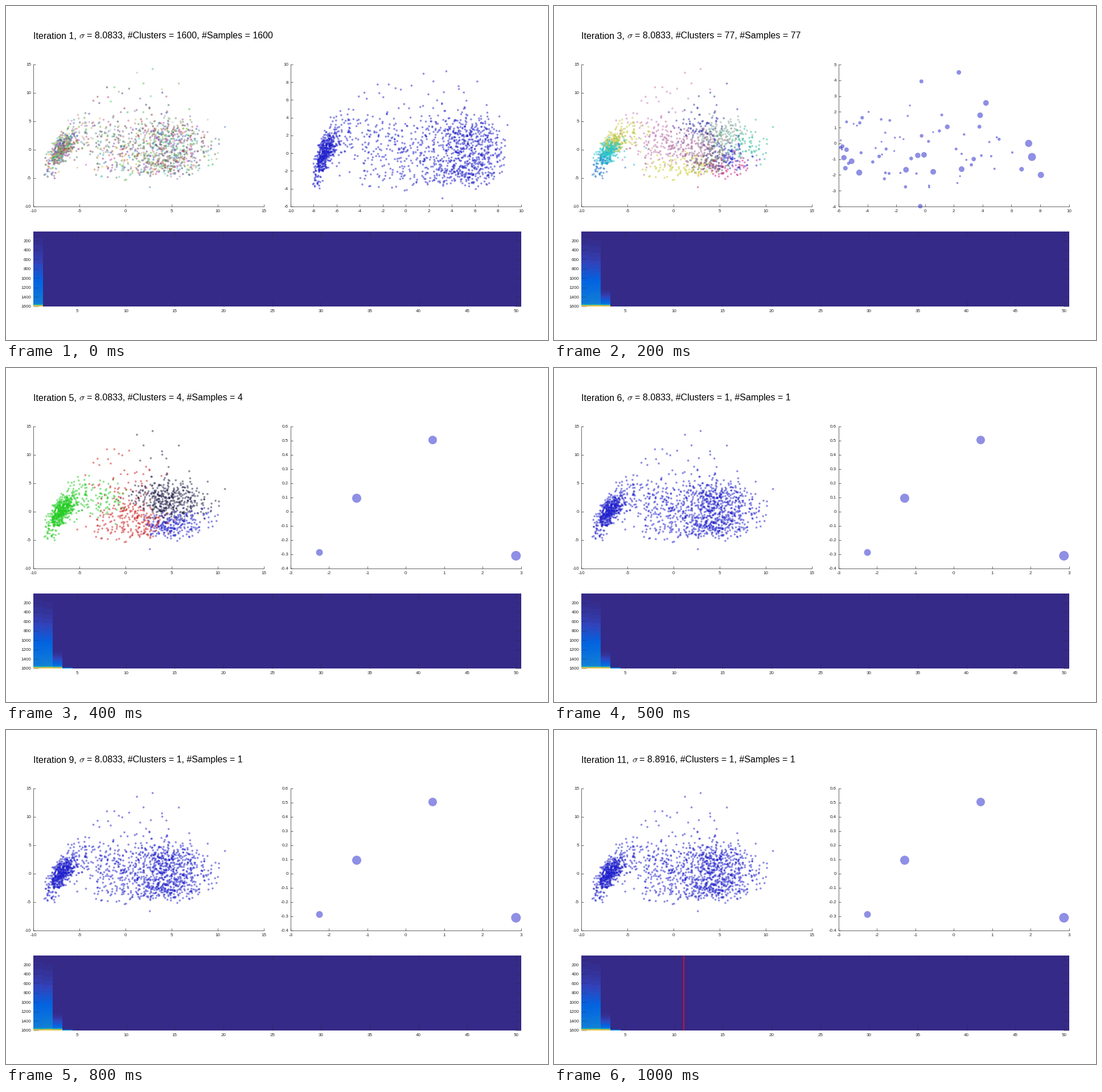
Recreate the animation shown at these times as a matplotlib script. Size 952 by 588 pixels, loop 1100 ms.

```python
import numpy as np
import matplotlib.pyplot as plt
from matplotlib.animation import FuncAnimation
from matplotlib.colors import LinearSegmentedColormap, to_rgb

W, H, DPI = 952, 588, 100
PT = 72 / DPI
INK = (0.15, 0.15, 0.15)
BLUE = (0.13, 0.13, 0.8)
COUNTS = [1600, 440, 77, 15, 4] + [1] * 6

plt.rcParams.update({
    "font.family": "Liberation Sans",
    "mathtext.fontset": "cm",
    "axes.unicode_minus": False,
    "axes.linewidth": 0.5,
    "axes.edgecolor": INK,
})
rng = np.random.default_rng(12)

# ---------- sample cloud ----------
PEAKS = np.array([(2.95, 14.2), (1.25, 13.55), (5.8, 11.65), (-1.2, 11),
                  (0.4, 10.75), (4, 10.05), (2.65, -6.6), (10.8, 4)])


def make_cloud(total):
    """Tilted dense streak on the left, broad cloud with an upper tail on the right."""
    n = 560
    t = np.clip(rng.normal(0, 1, n), -2.3, 2.5)
    spread = 1 + 0.4 * np.maximum(t, 0)
    sx = -6.9 + 0.8 * t + 0.12 * t ** 2 + rng.normal(0, 0.42, n) * spread
    sy = 0.2 + 1.6 * t + rng.normal(0, 0.8, n) * spread
    streak = np.c_[sx, sy]

    m = total - n - len(PEAKS)
    x = np.where(rng.random(m) < 0.45,
                 rng.uniform(-3.2, 5, m) + rng.normal(0, 0.7, m),
                 rng.normal(5.2, 2, m))
    x = np.where(x > 10.3, rng.uniform(3, 9, m), x)
    y = np.where(rng.random(m) < 0.84,
                 -4.9 + 9.6 * rng.beta(1.5, 1.7, m),
                 rng.gamma(5, 0.95, m) - 0.2 * x) + rng.normal(0, 0.4, m)
    taper = np.sqrt(np.clip((11.2 - x) / 4.4, 0.1, 1))
    return np.vstack([PEAKS, streak, np.c_[x, y * taper]])


CLOUD = make_cloud(1600)


def warp(p):
    return np.c_[10.2 * np.tanh(p[:, 0] / 8.2), 13 * np.tanh(p[:, 1] / 16)]


# ---------- cluster colours ----------
def palette(n):
    return rng.uniform(0.18, 0.86, (n, 3))


def paint(centers, colors, jitter):
    """Colour each sample by its nearest centre, with fuzzy borders."""
    p = CLOUD + rng.normal(0, jitter, CLOUD.shape)
    d = ((p[:, None] - centers[None]) ** 2).sum(2)
    return np.asarray(colors)[d.argmin(1)]


def paint_random(n, jitter):
    return paint(rng.permutation(CLOUD)[:n], palette(n), jitter)


def paint_named(patches, jitter):
    return paint(np.array([p[:2] for p in patches]), [to_rgb(p[2]) for p in patches], jitter)


PATCHES = [
    (-7, -0.5, "#22c4cc"), (-8.4, -3.8, "#2277cc"), (-6, 2.2, "#c8c844"),
    (-2, 0, "#bb77aa"), (-1, 7, "#cc77bb"), (0.3, -4, "#cccc33"),
    (2.3, 5.5, "#3333aa"), (2.5, 0.5, "#aa6699"), (4.3, -1.5, "#666a66"),
    (6, -1.4, "#2a2acc"), (6.3, -4, "#cc2288"), (5, 2.5, "#88aa99"),
    (8.5, 0.8, "#33bb99")]
QUARTET = [
    (-5, 2, "#22cc22"), (0.2, -1.5, "#cc2222"), (-0.5, 9, "#cc2222"),
    (5, 1.8, "#22224c"), (6, -3.2, "#2222cc"), (4.5, 12, "#22224c")]

COLORS = [
    palette(1600),
    paint_random(440, 0.3),
    paint_named(PATCHES, 1.0),
    paint_random(15, 0.6),
    paint_named(QUARTET, 0.8),
    np.tile(BLUE, (1600, 1)),
]


# ---------- condensed samples: x, y, radius in pixels ----------
def make_arch(n, x0, x1, drop, rise, grain):
    """Bubbles between a shallow floor and a high dome, denser on the left."""
    x = x0 + (x1 - x0) * rng.beta(1.0, 1.6, n)
    dome = np.sin(np.pi * (x - x0) / (x1 - x0))
    lo, hi = -1.6 - drop * dome, 1.4 + rise * dome
    y = lo + (hi - lo) * rng.beta(1.3, 1.6, n)
    return np.c_[x, y, np.minimum(1.6 + rng.gamma(1.2, grain, n), 5)]


def make_rim(n):
    """Large bubbles falling along the right edge."""
    u = np.linspace(0, 1, n)
    x = 7.8 + 2 * u ** 0.8 + rng.normal(0, 0.15, n)
    y = 1.6 - 6 * u + rng.normal(0, 0.2, n)
    return np.c_[x, y, rng.uniform(2.5, 4.8, n)]


SUMMITS = [(2.68, 7.06, 2), (4.12, 6.32, 2.7), (4.3, 6.05, 2), (4.8, 5.73, 2), (0.6, 6.2, 1.8)]
GIANTS = [(7.2, 0, 6.3), (7.43, -0.86, 7), (8.05, -2, 5.5), (2.35, 4.5, 4), (-0.25, 3.93, 3.5),
          (-5.1, -1.13, 5), (-4.57, -1.85, 5.3), (-1.32, -1.67, 5), (0.57, -1.8, 5),
          (-0.33, -3.98, 4)]
FOUR = [(0.7, 0.505, 7.5), (-1.28, 0.095, 8), (-2.25, -0.287, 6), (2.87, -0.31, 8.5)]

BUBBLES = [
    np.c_[warp(CLOUD), np.full(1600, 1.8)],
    np.vstack([make_arch(417, -5.4, 8, 2, 3.8, 0.4), make_rim(18), SUMMITS]),
    np.vstack([make_arch(67, -6, 7, 1.5, 2.5, 0.9), GIANTS]),
    np.c_[rng.uniform(-3.6, 5.5, 15), rng.uniform(-1.3, 2.2, 15), rng.uniform(3, 7.5, 15)],
    np.array(FOUR),
]
VIEWS = [
    ((-10, 10, 2), (-6, 10, 2)),
    ((-6, 10, 2), (-6, 8, 2)),
    ((-6, 10, 2), (-4, 5, 1)),
    ((-4, 6, 2), (-1.5, 2.5, 0.5)),
    ((-3, 3, 1), (-0.4, 0.6, 0.1)),
]

# ---------- heat map ----------
PARULA = LinearSegmentedColormap.from_list("parula", [
    (0, "#352a87"), (0.0625, "#3243ba"), (0.125, "#0363e1"), (0.25, "#1485d4"),
    (0.375, "#06a7c6"), (0.5, "#38b99e"), (0.625, "#92bf73"), (0.75, "#d9ba56"),
    (0.875, "#fcce2e"), (1, "#f9fb0e")])


def heat_column(start, peak, band):
    """Slow ramp from a start row, closed by a bright band at the bottom."""
    rows = np.arange(1, 1601)
    ramp = peak * np.clip((rows - start) / (1600 - start), 0, 1) ** 1.5
    return np.round((ramp + band / (1 + np.exp((1567 - rows) / 8))) * 80) / 80


HEAT = np.zeros((1600, 50))
HEAT[:, :4] = np.transpose([heat_column(0, 0.24, 0.58), heat_column(60, 0.25, 0.6),
                            heat_column(1200, 0.2, 0.6), heat_column(1570, 0.4, 0)])

# ---------- figure ----------
fig = plt.figure(figsize=(W / DPI, H / DPI), dpi=DPI, facecolor="white")


def add_axes(x0, y0, x1, y1, tick):
    ax = fig.add_axes([x0 / W, 1 - y1 / H, (x1 - x0) / W, (y1 - y0) / H])
    ax.tick_params(direction="in", length=tick * PT, width=0.5, color=INK,
                   labelcolor=INK, labelsize=8 * PT)
    ax.tick_params(axis="x", pad=5 * PT)
    ax.tick_params(axis="y", pad=4 * PT)
    return ax


def set_view(ax, xr, yr):
    for axis, limit, (lo, hi, step) in ((ax.xaxis, ax.set_xlim, xr), (ax.yaxis, ax.set_ylim, yr)):
        ticks = np.round(np.arange(lo, hi + step / 2, step), 6) + 0.0
        axis.set_ticks(ticks, [f"{v:g}" for v in ticks])
        limit(lo, hi)


def dots(ax):
    ax.spines[["top", "right"]].set_visible(False)
    return ax.scatter([], [], alpha=0.5, linewidths=0, clip_on=False, zorder=3)


def area(radius):
    return (2 * radius * PT) ** 2


left = add_axes(48, 103, 452.5, 353, 4)
right = add_axes(500, 103, 904.5, 353, 4)
bottom = add_axes(48, 397, 904.4, 529, 8.6)

samples, bubbles = dots(left), dots(right)
set_view(left, (-10, 15, 5), (-10, 15, 5))
samples.set_offsets(CLOUD)
samples.set_sizes([area(1.8)])

heat = bottom.imshow(HEAT, cmap=PARULA, vmin=0, vmax=1, aspect="auto",
                     interpolation="nearest", extent=(0.5, 50.5, 1600.5, 0.5))
bottom.spines[:].set_visible(False)
bottom.set_xticks(range(5, 51, 5))
bottom.set_yticks(range(200, 1601, 200))
bottom.tick_params(top=True, right=True, color=(*INK, 0.5))
marker = bottom.axvline(11, color="#c81432", lw=2 * PT)


def heading(s=""):
    return fig.text(0, 1 - 57.5 / H, s, fontsize=16 * PT, color="black", va="baseline")


head, sigma, tail = heading(), heading(r"$\sigma$"), heading()
head.set_x(48 / W)


def update(i):
    n, k = i + 1, COUNTS[i]
    stage = min(i, 4)
    bumped = n >= 11

    shift = 8.9 * (len(str(n)) - 1)
    head.set_text(f"Iteration {n},")
    sigma.set_x((128 + shift) / W)
    tail.set_x((141.6 + shift) / W)
    tail.set_text(f"= {8.8916 if bumped else 8.0833:.4f}, #Clusters = {k}, #Samples = {k}")

    samples.set_facecolors(COLORS[min(i, 5)])
    samples.set_alpha(0.5)

    b = BUBBLES[stage]
    bubbles.set_offsets(b[:, :2])
    bubbles.set_sizes(area(b[:, 2]))
    bubbles.set_facecolors([BLUE])
    bubbles.set_alpha(0.5)
    set_view(right, *VIEWS[stage])

    heat.set_data(np.where(np.arange(50) < n, HEAT, 0))
    marker.set_visible(bumped)
    return samples, bubbles, heat, marker, head, sigma, tail


anim = FuncAnimation(fig, update, frames=len(COUNTS), interval=100, repeat=True, repeat_delay=0)
plt.show()
```
